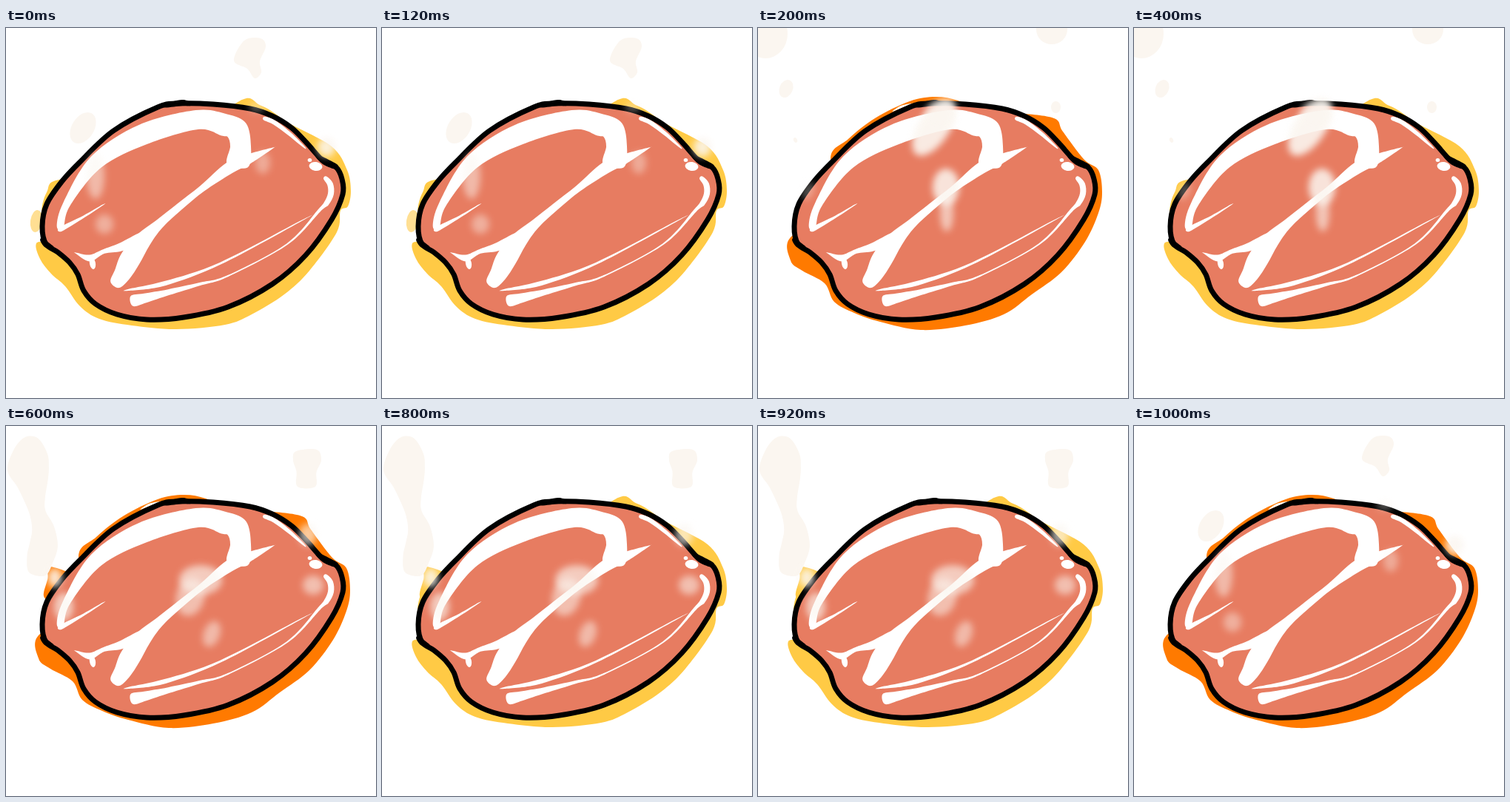
Recreate the animation shown at these times as an HTML page. Size 500 px wide and 500 px high, loop 1.2 s.

```html
<!DOCTYPE html>
<html lang="en">
<head>
<meta charset="utf-8">
<title>Steaming bun</title>
<style>
  html, body { margin: 0; width: 100%; height: 100%; overflow: hidden; background: #fff; }
  svg { display: block; width: 100%; height: 100%; }
</style>
</head>
<body>
<svg id="stage" viewBox="0 0 500 500">
  <defs>
    <filter id="soft" x="-80%" y="-80%" width="260%" height="260%"><feGaussianBlur stdDeviation="5"/></filter>
  </defs>
</svg>
<script>
const NS = 'http://www.w3.org/2000/svg';
const STEP = 200, LOOP = 1200;
const STEAM = '#fbf6f0', YELLOW = '#ffca45', ORANGE = '#ff7a00';
const stage = document.getElementById('stage');

function add(parent, tag, attrs = {}) {
  const el = document.createElementNS(NS, tag);
  for (const key in attrs) el.setAttribute(key, attrs[key]);
  parent.appendChild(el);
  return el;
}

const parse = text => text.trim().split(/\s+/).map(s => s.split(',').map(Number));

// Closed curve through a list of points
function curve(p, k = 1 / 6) {
  const n = p.length, at = i => p[(i + n) % n];
  let d = 'M' + p[0];
  for (let i = 0; i < n; i++) {
    const [a, b, c, e] = [at(i - 1), at(i), at(i + 1), at(i + 2)];
    const c1 = [0, 1].map(j => b[j] + (c[j] - a[j]) * k);
    const c2 = [0, 1].map(j => c[j] - (e[j] - b[j]) * k);
    d += `C${c1} ${c2} ${c}`;
  }
  return d + 'Z';
}

const group = () => add(stage, 'g');
const shape = (g, fill, text) => add(g, 'path', { d: curve(parse(text)), fill });
const oval = (g, fill, x, y, rx, ry, turn = 0) =>
  add(g, 'ellipse', { cx: x, cy: y, rx, ry, fill, transform: `rotate(${turn} ${x} ${y})` });

// Brush stroke along "x,y,width" points
function brush(g, fill, text) {
  const p = parse(text), left = [], right = [];
  p.forEach(([x, y, w], i) => {
    const a = p[Math.max(i - 1, 0)], b = p[Math.min(i + 1, p.length - 1)];
    const dx = b[0] - a[0], dy = b[1] - a[1], s = w / 2 / Math.hypot(dx, dy);
    left.push([x - dy * s, y + dx * s]);
    right.unshift([x + dy * s, y - dx * s]);
  });
  return add(g, 'path', { d: curve([...left, ...right]), fill });
}

function haze(g, alpha, ...place) {
  const el = oval(g, STEAM, ...place);
  el.setAttribute('opacity', alpha);
  el.setAttribute('filter', 'url(#soft)');
}

// Glow behind the bun
const yellow = group(), orange = group(), puff = group(), wisp = group();
shape(yellow, YELLOW, `310,102 345,105 385,130 440,160 461,192 466,220 462,241 452,247 447,276
  410,328 376,360 332,387 296,401 230,407 170,402 126,393 100,376 80,349 61,332 46,312 41,291
  60,285 48,255 55,222 77,204 200,200`);
shape(orange, ORANGE, `98,177 122,150 158,122 205,99 240,93 270,98 300,112 350,115 400,122 412,140
  441,178 460,192 465,222 460,250 442,289 410,330 370,360 332,387 280,402 220,408 165,397 130,385
  103,370 90,345 60,328 44,314 46,281 120,250`);
brush(orange, '#fff', '183,112,1 195,106,3 211,102,1');
oval(puff, '#ffdf93', 41, 261, 8, 15, 8);
brush(wisp, 'currentColor', '74,196,32 68,212,26 56,232,12');

// Bun
const bun = group();
const body = shape(bun, '#e77c61', `232,102 280,103 330,109 360,119 386,135 407,156 428,179 446,188
  454,204 455,225 440,259 405,307 360,346 300,377 240,391 190,394 150,387 121,373 105,355 97,333
  86,317 70,303 54,292 49,268 55,238 75,208 100,181 145,139 205,107`);
body.setAttribute('stroke', '#000');
body.setAttribute('stroke-width', 7);
brush(bun, '#000', '48,285,5 55,293,8 64,297,3');
brush(bun, '#000', '214,105,5 238,101,8 250,103,4');
brush(bun, '#000', '420,173,4 432,181,9 447,188,6');

// Highlights
[
  '73,269,9 82,238,10 122,181,20 185,144,28 258,124,26 295,131,30 312,138,31 317,160,28 313,186,28',
  '74,272,6 105,255,3 131,239,1',
  '361,162,1 328,177,13 302,189,16 265,217,9 235,241,10 207,265,13 186,286,22 168,312,28 157,333,23 147,347,14',
  '190,281,14 155,296,11 132,302,6 113,311,9 94,304,1',
  '349,122,5 363,128,6 383,143,5 403,161,2',
  '431,202,5 438,211,8 439,224,8 433,237,7 423,247,4 380,292,2 300,335,2 262,346,4 220,357,8 188,365,13 170,369,14',
  '400,260,1 290,318,3 215,345,6 165,354,2'
].forEach(line => brush(bun, '#fff', line));
oval(bun, '#fff', 117, 318, 4, 8, -10);
oval(bun, '#fff', 418.5, 187, 9, 6, 8);
oval(bun, '#fff', 410.5, 178.5, 2.8, 2.5);

// Steam poses
const steam = [group(), group(), group()];
const [rise, drift, column] = steam;

shape(rise, STEAM, '322,17 344,14 351,25 343,45 345,60 336,68 326,55 308,44');
oval(rise, STEAM, 104, 135, 15, 23, 32);
haze(rise, .5, 121, 200, 12, 31);
haze(rise, .42, 133, 265, 12, 13);
haze(rise, .38, 347, 182, 10, 15);
haze(rise, .85, 433, 161, 12, 13);
haze(rise, .35, 339, 107, 11, 7);

oval(drift, STEAM, 10, 8, 30, 33);
oval(drift, STEAM, 397, 2, 21, 20);
oval(drift, STEAM, 38, 82, 9, 12.5, 22);
oval(drift, STEAM, 50.5, 151.5, 2.5, 3.5, -25);
oval(drift, STEAM, 402.5, 107, 6.5, 8);
haze(drift, .9, 238, 134, 21, 44, 33);
haze(drift, .5, 246, 116, 20, 18);
haze(drift, .85, 254, 215, 18, 25);
haze(drift, .6, 255, 250, 9, 25);
haze(drift, .35, 68, 220, 7, 13, 25);

brush(column, STEAM, `34,16,18 33,35,46 30,58,56 36,78,42 39,100,28 43,118,22 50,138,30 51,160,38
  46,180,36 42,200,22`);
brush(column, STEAM, '406,33,28 407,46,38 406,62,27 406,82,24');
haze(column, .85, 66, 205, 10, 13);
haze(column, .65, 78, 244, 13, 19);
haze(column, .65, 263, 208, 29, 20);
haze(column, .55, 249, 231, 19, 26, 15);
haze(column, .5, 278, 281, 11, 18, 20);
haze(column, .55, 415, 215, 14, 13);
haze(column, .65, 408, 147, 12, 15);

const show = (g, on) => g.setAttribute('display', on ? 'inline' : 'none');

function draw(time) {
  const step = Math.floor((time % LOOP) / STEP);
  const pose = Math.floor((step + 1) / 2) % 3;
  const hot = step % 2 === 1;
  stage.style.color = hot ? ORANGE : YELLOW;
  show(yellow, !hot);
  show(orange, hot);
  show(puff, !hot && pose === 0);
  show(wisp, pose === 2);
  steam.forEach((g, i) => show(g, i === pose));
}

const start = performance.now();
function tick() {
  draw(performance.now() - start);
  requestAnimationFrame(tick);
}
tick();
</script>
</body>
</html>
```
